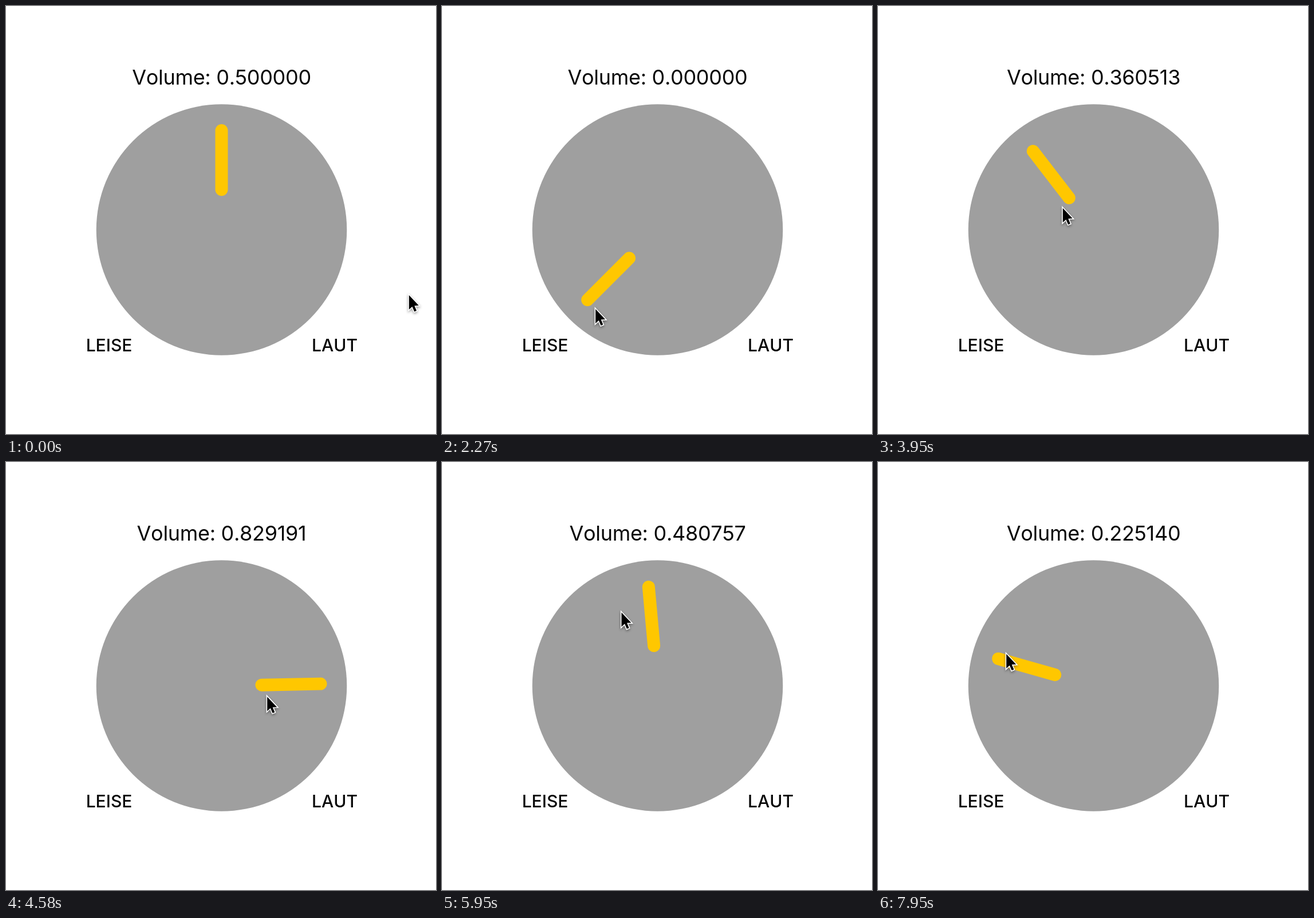
Animation of 751x746 px, one loop 8000 ms. Source, as an HTML page with a canvas:

```html
<!DOCTYPE html>
<html lang="de">
<head>
<meta charset="utf-8">
<title>Volume</title>
<style>
  html, body { margin: 0; width: 100%; height: 100%; overflow: hidden; background: #fff; }
  canvas { display: block; width: 100vw; height: 100vh; }
</style>
</head>
<body>
<canvas id="stage" width="751" height="746"></canvas>
<script>
const canvas = document.getElementById('stage');
const ctx = canvas.getContext('2d');
const LOOP = 8000, LAG = 40, PRESS = 650;
const CX = 376.5, CY = 390, RADIUS = 218.8;
const FONT = 'Inter, "Open Sans", sans-serif';

// Where the hand turns or pauses: time, degrees clockwise from the top, distance
const TURNS = [
  [0, 108.75, 343.8],
  [700, 143, 212],
  [1140, 0, 140],
  [1430, 150.9, 175.7],
  [2321, -143, 174],
  [2470, -153, 198],
  [3330, 157, 194],
  [4211, -106, 38],
  [4610, 104, 80],
  [4977, -138, 62],
  [5230, -91.3, 65.5],
  [5560, 100, 80],
  [6430, -200, 238],
  [7000, -151.8, 223],
  [7365, -150, 236],
  [8103, -60, 157]
];

const ARROW = [[0, 0], [0, 25], [5.6, 19.8], [9.4, 28.6], [13.2, 27], [9.5, 18.3], [17, 18]];

const ease = u => (1 - Math.cos(Math.PI * u)) / 2;

function handAt(t) {
  const next = TURNS.findIndex(turn => turn[0] > t);
  const [t0, a0, d0] = TURNS[next - 1];
  const [t1, a1, d1] = TURNS[next];
  const u = ease((t - t0) / (t1 - t0));
  return { angle: a0 + (a1 - a0) * u, distance: d0 + (d1 - d0) * u };
}

// The knob follows the hand a little late and stops at both ends of its 270° range
function volumeAt(t) {
  if (t < PRESS) return 0.5;
  let { angle } = handAt(t - LAG);
  if (angle < -180) angle += 360;
  return Math.min(1, Math.max(0, angle / 270 + 0.5));
}

function label(text, x, y, size, weight, spacing = 0) {
  ctx.font = `${weight} ${size}px ${FONT}`;
  ctx.fontKerning = 'none';
  ctx.letterSpacing = spacing + 'px';
  ctx.textAlign = 'center';
  ctx.fillStyle = '#080808';
  ctx.fillText(text, x, y);
}

function drawKnob(volume) {
  ctx.fillStyle = '#9f9f9f';
  ctx.beginPath();
  ctx.arc(CX, CY, RADIUS, 0, Math.PI * 2);
  ctx.fill();

  ctx.save();
  ctx.translate(CX, CY);
  ctx.rotate((volume - 0.5) * 1.5 * Math.PI);
  ctx.strokeStyle = '#ffc700';
  ctx.lineWidth = 22;
  ctx.lineCap = 'round';
  ctx.beginPath();
  ctx.moveTo(0, -173);
  ctx.lineTo(0, -70);
  ctx.stroke();
  ctx.restore();
}

function drawPointer({ angle, distance }) {
  const a = angle * Math.PI / 180;
  ctx.save();
  ctx.translate(CX + distance * Math.sin(a) + 1.8, CY - distance * Math.cos(a) + 3.6);
  ctx.beginPath();
  ARROW.forEach(p => ctx.lineTo(...p));
  ctx.closePath();
  ctx.save();
  ctx.shadowColor = 'rgba(0, 0, 0, 0.4)';
  ctx.shadowBlur = 4;
  ctx.shadowOffsetY = 2;
  ctx.strokeStyle = '#fff';
  ctx.lineWidth = 3.2;
  ctx.stroke();
  ctx.restore();
  ctx.fillStyle = '#000';
  ctx.fill();
  ctx.restore();
}

function draw() {
  const t = performance.now() % LOOP;
  const volume = volumeAt(t);
  ctx.fillStyle = '#fff';
  ctx.fillRect(0, 0, canvas.width, canvas.height);
  label('Volume: ' + volume.toFixed(6), CX, 136.5, 36, 400, -0.3);
  drawKnob(volume);
  label('LEISE', 180, 601.5, 30, 450);
  label('LAUT', 574, 601.5, 30, 450);
  drawPointer(handAt(t));
  requestAnimationFrame(draw);
}
draw();
</script>
</body>
</html>
```
